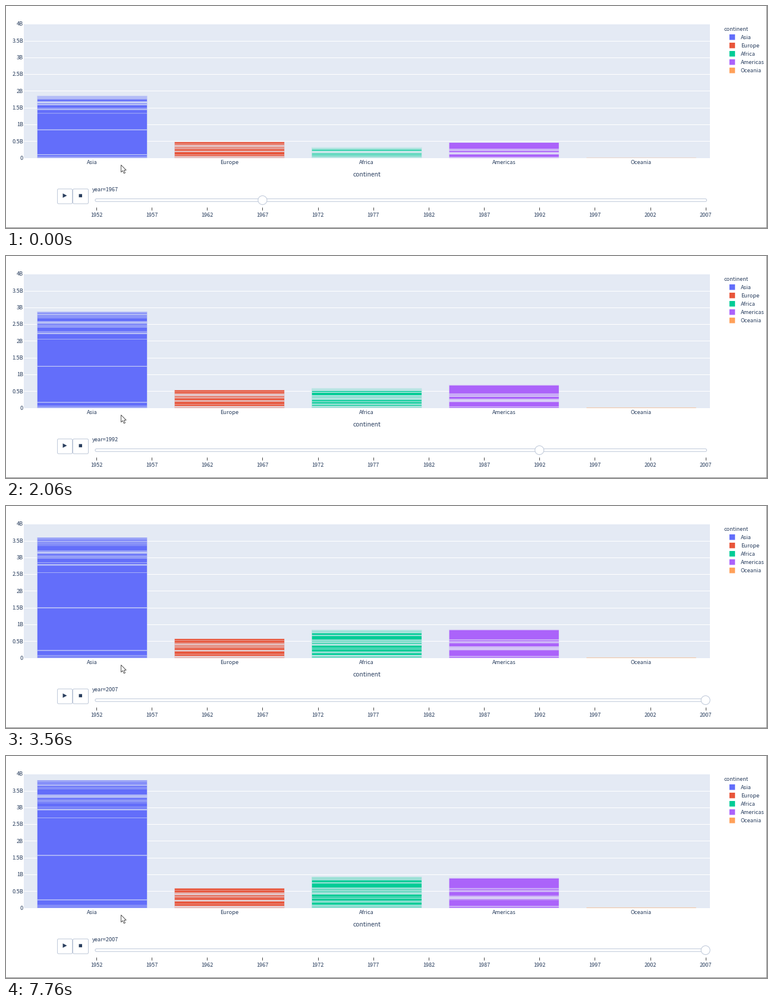
A matplotlib script that plays this animation: 1280x375 px, repeating every 8440 ms.

```python
import numpy as np
import matplotlib.pyplot as plt
from matplotlib.animation import FuncAnimation
from matplotlib.collections import PolyCollection
from matplotlib.patches import Circle, FancyBboxPatch, Polygon, Rectangle

W, H, DPI = 1280, 375, 100
PX = 72 / DPI
LOOP, STEP = 8440, 20
REFRESH = 136.2  # ms between screen updates while the chart plays

INK, PLOT_BG, EDGE = "#2a3f5f", "#e4eaf4", "#bec8d9"
Y0, Y1 = 1967, 2007

# name, colour, band count, total in millions at Y0 and Y1, growth bend
# (1 is linear, towards 0 is exponential), wide bands {index: share at Y0, Y1}
REGIONS = [
    ("Asia", "#636efa", 33, 1906, 3812, 1,
     {2: (.033, .039), 4: (.396, .346), 6: (.266, .291), 7: (.057, .059),
      11: (.053, .033), 22: (.032, .044)}),
    ("Europe", "#e8553b", 30, 481, 586, 1,
     {9: (.103, .104), 10: (.159, .141), 15: (.11, .1), 19: (.066, .066),
      28: (.07, .12), 29: (.114, .104)}),
    ("Africa", "#00cc96", 52, 335, 930, .25,
     {10: (.06, .07), 14: (.095, .086), 17: (.083, .082), 36: (.141, .145)}),
    ("Americas", "#ab63fa", 25, 480, 899, .9,
     {0: (.048, .045), 2: (.183, .211), 15: (.1, .121), 22: (.414, .335)}),
    ("Oceania", "#ffa15a", 2, 14.6, 24.5, 1, {0: (.82, .83)}),
]

LEFT, RIGHT, TOP, BASE = 29.5, 1184, 30.2, 256.7
CAT = (RIGHT - LEFT) / 5
SCALE = (BASE - TOP) / 4000
RAIL_X, RAIL_Y, RAIL_STEP = 152, 328, 93.15

plt.rcParams["font.family"] = ["Noto Sans CJK JP", "Liberation Sans"]
fig = plt.figure(figsize=(W / DPI, H / DPI), dpi=DPI, facecolor="white")
ax = fig.add_axes([0, 0, 1, 1])
ax.set(xlim=(0, W), ylim=(H, 0))
ax.axis("off")


def text(x, y, s, size=9.2, ha="left"):
    return ax.text(x, y, s, size=size * PX, color=INK, ha=ha, va="baseline")


def box(x, y, w, h, color, **kw):
    ax.add_patch(Rectangle((x, y), w, h, fc=color, lw=0, **kw))


def rounded(x, y, w, h, r):
    ax.add_patch(FancyBboxPatch((x, y), w, h, fc="white", ec=EDGE, lw=PX,
                                boxstyle=f"round,pad=0,rounding_size={r}"))


def draw_chart():
    box(LEFT, TOP, RIGHT - LEFT, BASE - TOP, PLOT_BG)
    for i in range(9):
        y = BASE - i * 500 * SCALE
        ax.plot([LEFT, RIGHT], [y, y], color="white", lw=PX,
                solid_capstyle="butt", zorder=1.5)
        text(29, y + 3.2, f"{i / 2:g}B" if i else "0", ha="right")
    for i, region in enumerate(REGIONS):
        text(LEFT + (i + .5) * CAT, 266.8, region[0], ha="center")
    text((LEFT + RIGHT) / 2, 288, "continent", 10.3, "center")


def draw_legend():
    text(1208, 42, "continent", 9)
    for i, (name, color, *_) in enumerate(REGIONS):
        y = 52.6 + 14.05 * i
        box(1216.8, y - 4.7, 9.4, 9.4, color, snap=False)
        text(1236, y + 3.4, name)


def draw_controls():
    rounded(86.5, 309, 25, 25, 2)
    rounded(112.5, 309, 26, 25, 2)
    ax.add_patch(Polygon([(95.5, 316.6), (102.5, 320.3), (95.5, 324)],
                         fc=INK, lw=0))
    box(122.6, 317.7, 5.4, 5.4, INK, snap=False)
    rounded(150, RAIL_Y - 2.3, 1028.5, 4.6, 2.2)
    for i in range(12):
        x = RAIL_X + i * RAIL_STEP
        ax.plot([x, x], [340, 345], color="#444444", lw=PX,
                solid_capstyle="butt")
        text(x, 356, str(1952 + 5 * i), ha="center")
    box(0, 374, W, 1, "#8c8c8c")
    box(1279, 0, 1, H, "#8c8c8c")


def split(count, wide, rng):
    """Shares of each band at Y0 and Y1: given wide bands, random thin ones."""
    thin = rng.lognormal(0, .9, count)
    thin[list(wide)] = 0
    shares = np.outer(thin / thin.sum(), 1 - np.sum(list(wide.values()), 0))
    for i, pair in wide.items():
        shares[i] = pair
    return shares


def bar_rects(year):
    u = (year - Y0) / (Y1 - Y0)
    rects = []
    for r, (_, _, _, a, b, k, _) in enumerate(REGIONS):
        total = (a**k + (b**k - a**k) * u) ** (1 / k)
        share = SHARES[r] @ (1 - u, u)
        y = BASE - SCALE * total * np.append(0, np.cumsum(share))
        x0 = LEFT + (r + .1) * CAT
        x1 = x0 + .8 * CAT
        rects += [[(x0, lo), (x1, lo), (x1, hi), (x0, hi)]
                  for lo, hi in zip(y, y[1:])]
    return rects


def bar_year(t):
    return np.interp(t, [0, 545, 3990], [1965.9, 1972.2, Y1])


def slider_year(t):
    return min(Y1, Y0 + 5 * int((t + 460) // 500))


def cursor_tip(t):
    # A short flick to the upper right and back, in three jumps
    phase = int((t - 7520) // 120)
    away = {0: 1, 1: .4}.get(phase, 0)
    return 193.5 + 52 * away, 268.5 - 23 * away


draw_chart()
draw_legend()
draw_controls()

rng = np.random.default_rng(7)
SHARES = [split(count, wide, rng) for _, _, count, _, _, _, wide in REGIONS]
fills = [color for _, color, count, *_ in REGIONS for _ in range(count)]
bars = PolyCollection(bar_rects(Y0), facecolors=fills, edgecolors="#e5ecf6",
                      linewidths=.36 * PX, zorder=2)
bars.set_snap(False)
ax.add_collection(bars, autolim=False)
knob = ax.add_patch(Circle((0, RAIL_Y), 7.5, fc="white", ec=EDGE, lw=PX,
                           zorder=3))
label = text(144.5, 312.8, "")
ARROW = np.array([(0, 0), (0, 12.2), (2.8, 9.6), (4.9, 14.2), (7, 13.3),
                  (5, 8.8), (8.7, 8.8)])
cursor = ax.add_patch(Polygon(ARROW, fc="white", ec="#444444", lw=.9 * PX,
                              joinstyle="miter", zorder=4))


def update(i):
    now = i * STEP
    t = (now + STEP) // REFRESH * REFRESH
    year = slider_year(t)
    bars.set_verts(bar_rects(bar_year(t)))
    knob.center = RAIL_X + (year - 1952) / 5 * RAIL_STEP, RAIL_Y
    label.set_text(f"year={year}")
    cursor.set_xy(ARROW + cursor_tip(now))
    return bars, knob, label, cursor


anim = FuncAnimation(fig, update, frames=LOOP // STEP, interval=STEP,
                     repeat=True, repeat_delay=0, blit=False)
plt.show()
```
